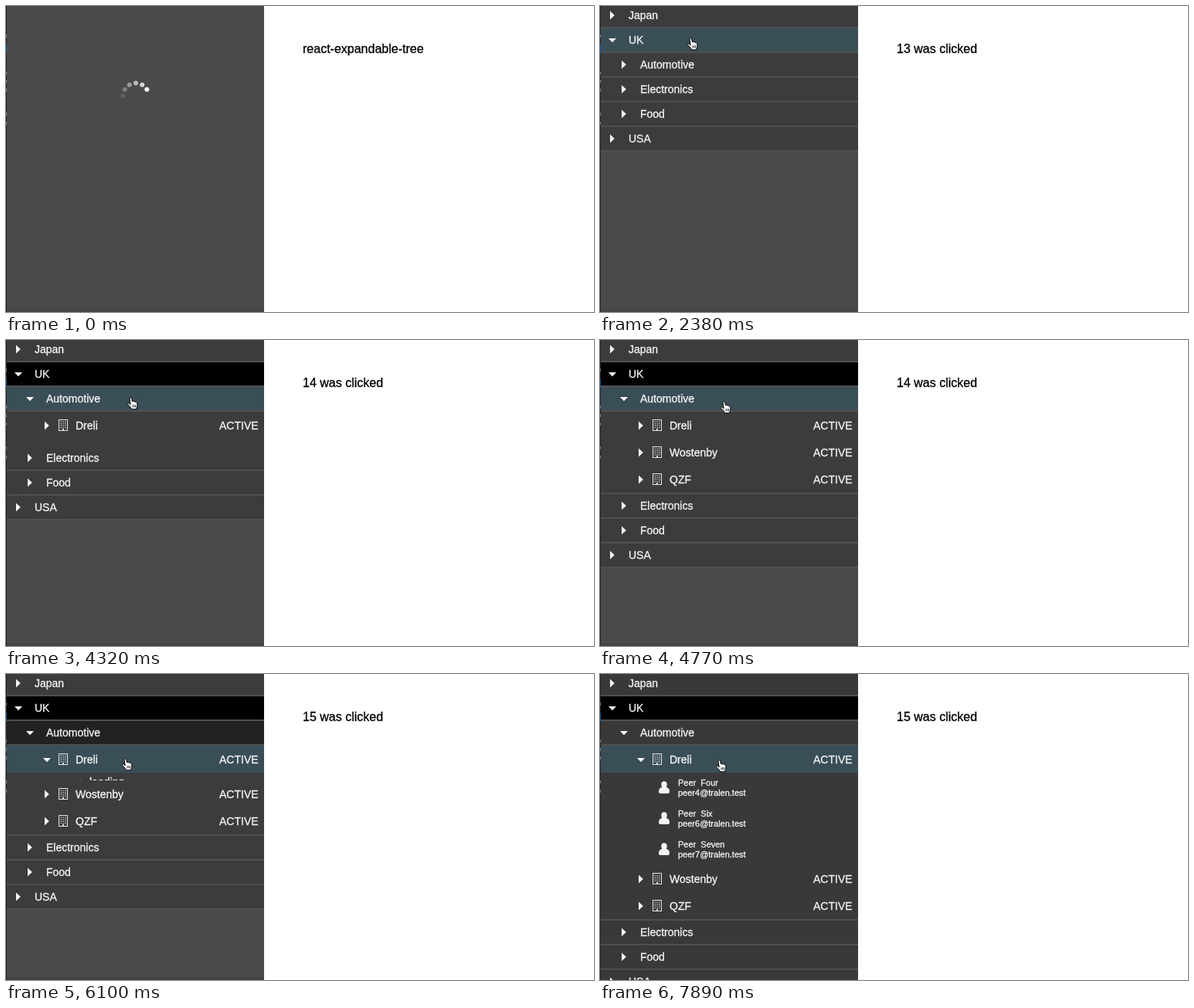
Recreate the animation shown at these times as an HTML page with a canvas. Size 761x397 px, loop 8000 ms.

```html
<!DOCTYPE html>
<html lang="en">
<head>
<meta charset="utf-8">
<title>Expandable tree</title>
<style>
html, body { margin: 0; width: 100%; height: 100%; overflow: hidden; background: #fff; }
canvas { display: block; }
</style>
</head>
<body>
<canvas id="stage" width="761" height="397"></canvas>
<script>
const ctx = document.getElementById('stage').getContext('2d');
const LOOP = 8000, PANEL = 333;
const BLUE = '#3a4e58', INK = '#f6f6f6', RULE = '#505050';
const LIST = 300, CLICK_UK = 2230, CLICK_AUTO = 4320, CLICK_FIRM = 6100, USERS = 6837;

// Bursts of redraws: start, end, number of steps
const bursts = [
  [0, 0, 1], [150, 300, 2], [900, 900, 1], [1190, 1630, 4], [2230, 3270, 8], [3420, 3420, 1],
  [4320, 5360, 8], [5510, 5510, 1], [6100, 6400, 3], [6510, 7000, 4], [7890, 7890, 1]
];
const ticks = bursts.flatMap(([a, b, n]) =>
  Array.from({ length: n }, (_, i) => Math.round(n > 1 ? a + (b - a) * i / (n - 1) : a)));

// Pointer path: time, x, y
const path = [
  [900, 426, 158], [1190, 348, 129], [1337, 238, 88], [1483, 144, 53], [1630, 113, 41],
  [2527, 113, 41], [3270, 151, 71], [3420, 157, 74], [4617, 157, 74], [5360, 154, 98],
  [5510, 150, 109], [7000, 150, 109], [7890, 150, 111]
];

const handShape = new Path2D('M3 2C3 .3 5.4 .3 5.7 2L6.5 6C7 4.8 8.6 5 8.8 6.3C9.3 5.4 10.6 5.6 10.9 6.9' +
  'C11.6 6.2 12.8 6.8 12.8 8V11C12.8 13 11.6 13.5 11.5 15.8H5.5C5.3 14 3 12.2 .8 9.4C.2 8 1.8 7.4 2.8 8.6L4.2 9.8Z');
const handLines = new Path2D('M7 10.2V13.4M8.8 10.2V13.4M10.5 10.2V13.4');
const arrowShape = new Path2D('M1 1V15L4.2 12L6.6 17L8.8 16L6.5 11.2H11Z');
const bodyShape = new Path2D('M-3 0H3C6 .5 7 3 7 5.5Q7 8 5 8H-5Q-7 8 -7 5.5C-7 3 -6 .5 -3 0Z');

function box(x, y, w, h, color) {
  ctx.fillStyle = color;
  ctx.fillRect(x, y, w, h);
}

// A hairline stroke gives the text its slightly heavy weight
function text(s, x, y, size = 14, color = INK) {
  ctx.font = size + 'px "Liberation Sans", Arial, sans-serif';
  ctx.fillStyle = ctx.strokeStyle = color;
  ctx.lineWidth = 0.3;
  ctx.fillText(s, x, y);
  ctx.strokeText(s, x, y);
}

function caret(x, y, open) {
  ctx.fillStyle = INK;
  ctx.beginPath();
  if (open) {
    ctx.moveTo(x - 2, y - 2); ctx.lineTo(x + 8, y - 2); ctx.lineTo(x + 3, y + 3.3);
  } else {
    ctx.moveTo(x, y - 5.5); ctx.lineTo(x + 5.8, y); ctx.lineTo(x, y + 5.5);
  }
  ctx.fill();
}

function spinner(cx, cy, r, dot, head) {
  for (let i = 0; i < 6; i++) {
    const a = (head - i) * Math.PI / 6;
    ctx.fillStyle = `rgba(255,255,255,${0.94 - i * 0.163})`;
    ctx.beginPath();
    ctx.arc(cx + r * Math.cos(a), cy + r * Math.sin(a), dot, 0, 7);
    ctx.fill();
  }
}

// A section opens in two steps
function slide(t, start) {
  return t < start ? 0 : t - start < 140 ? 0.42 : 1;
}

function group(y, h, draw) {
  if (h <= 0) return y;
  ctx.save();
  ctx.beginPath();
  ctx.rect(0, y, PANEL + 1, h);
  ctx.clip();
  draw(y);
  ctx.restore();
  return y + h;
}

function branch(label, depth, y, fill, open) {
  box(1, y, PANEL, 30, fill);
  box(1, y + 30, PANEL, 2, RULE);
  caret(13 + depth * 15, y + 15, open);
  text(label, 37 + depth * 15, y + 20);
  return y + 32;
}

function building(x, y) {
  ctx.strokeStyle = '#e4e4e4';
  ctx.lineWidth = 1;
  ctx.strokeRect(x + 0.5, y + 0.5, 11, 14);
  for (let i = 0; i < 12; i++) box(x + 2.6 + i % 3 * 2.8, y + 2.5 + (i / 3 | 0) * 2.5, 1.3, 1.3, '#d8d8d8');
  box(x + 5, y + 12, 2, 2, '#d8d8d8');
}

function firm(label, y, fill, open) {
  box(1, y, PANEL, 35, fill);
  caret(50, y + 18, open);
  building(68, y + 10);
  text(label, 90, y + 23);
  text('ACTIVE', 276, y + 23);
  return y + 35;
}

function user(name, n, y) {
  ctx.save();
  ctx.translate(83, y + 19);
  ctx.fillStyle = INK;
  ctx.beginPath();
  ctx.ellipse(0, -3.5, 3.7, 4.2, 0, 0, 7);
  ctx.fill();
  ctx.fill(bodyShape);
  ctx.restore();
  ctx.wordSpacing = '3px';
  text('Peer ' + name, 101, y + 17, 11);
  ctx.wordSpacing = '0px';
  text(`peer${n}@tralen.test`, 101, y + 30, 11);
}

function details(t, y, h, base) {
  return group(y, h, top => {
    box(1, top, PANEL, h, base);
    if (t < USERS) {
      spinner(92, top + 12, 5.5, 1.1, 8 + Math.round((t - 6400) / 150) * 2);
      text('loading...', 108, top + 17);
    } else {
      [['Four', 4], ['Six', 6], ['Seven', 7]].forEach(([name, n], i) => user(name, n, top + i * 40));
    }
  });
}

function tree(t) {
  const base = t < USERS ? '#3c3c3c' : '#393939';
  const ukFill = t < CLICK_UK ? base : t < CLICK_AUTO ? BLUE : '#000';
  const autoFill = t < CLICK_AUTO ? base : t < CLICK_FIRM ? BLUE : t < USERS ? '#222' : base;
  const picked = t >= CLICK_FIRM;
  const detailH = Math.round(24 * slide(t, CLICK_FIRM) + 96 * slide(t, USERS));
  const firmsH = Math.round(107 * slide(t, CLICK_AUTO)) + detailH;

  let y = branch('Japan', 0, -3, base);
  y = branch('UK', 0, y, ukFill, t >= CLICK_UK);
  y = group(y, Math.round((96 + firmsH) * slide(t, CLICK_UK)), top => {
    top = branch('Automotive', 1, top, autoFill, t >= CLICK_AUTO);
    top = group(top, firmsH, f => {
      f = firm('Dreli', f, picked ? BLUE : base, picked);
      f = details(t, f, detailH, base);
      f = firm('Wostenby', f, base);
      f = firm('QZF', f, base);
      box(1, f, PANEL, 2, RULE);
    });
    top = branch('Electronics', 1, top, base);
    branch('Food', 1, top, base);
  });
  branch('USA', 0, y, base);
}

function pointer(t) {
  if (t < path[0][0]) return;
  let i = path.length - 1;
  while (path[i][0] > t) i--;
  const a = path[i], b = path[i + 1] || a;
  const k = b === a ? 0 : (t - a[0]) / (b[0] - a[0]);
  ctx.save();
  ctx.translate(Math.round(a[1] + (b[1] - a[1]) * k), Math.round(a[2] + (b[2] - a[2]) * k));
  ctx.lineJoin = 'round';
  if (t < 1330) {
    ctx.strokeStyle = '#fff';
    ctx.lineWidth = 2;
    ctx.stroke(arrowShape);
    ctx.fillStyle = '#000';
    ctx.fill(arrowShape);
  } else {
    ctx.fillStyle = '#fff';
    ctx.fill(handShape);
    ctx.strokeStyle = '#000';
    ctx.lineWidth = 1;
    ctx.stroke(handShape);
    ctx.lineWidth = 0.8;
    ctx.stroke(handLines);
  }
  ctx.restore();
}

function render(now) {
  const t = ticks.filter(v => v <= now).pop();
  box(0, 0, 761, 397, '#fff');
  box(1, 0, PANEL, 397, '#4a4a4a');
  box(1, 393, PANEL, 4, '#464545');
  box(0, 0, 1, 397, '#222');
  box(0, 50, 1, 12, '#07599a');
  for (const y of [37, 85, 96, 107, 138, 150]) box(0, y, 1, 4, '#777');

  if (t < LIST) spinner(168, 116.5, 16.5, 3, t < 150 ? -1 : 1);
  else tree(t);

  const id = t < CLICK_AUTO ? 13 : t < CLICK_FIRM ? 14 : 15;
  text(t < CLICK_UK ? 'react-expandable-tree' : id + ' was clicked', 384, 61, 16, '#000');
  pointer(t);
}

const begin = performance.now();
function loop() {
  render((performance.now() - begin) % LOOP);
  requestAnimationFrame(loop);
}
loop();
</script>
</body>
</html>
```
